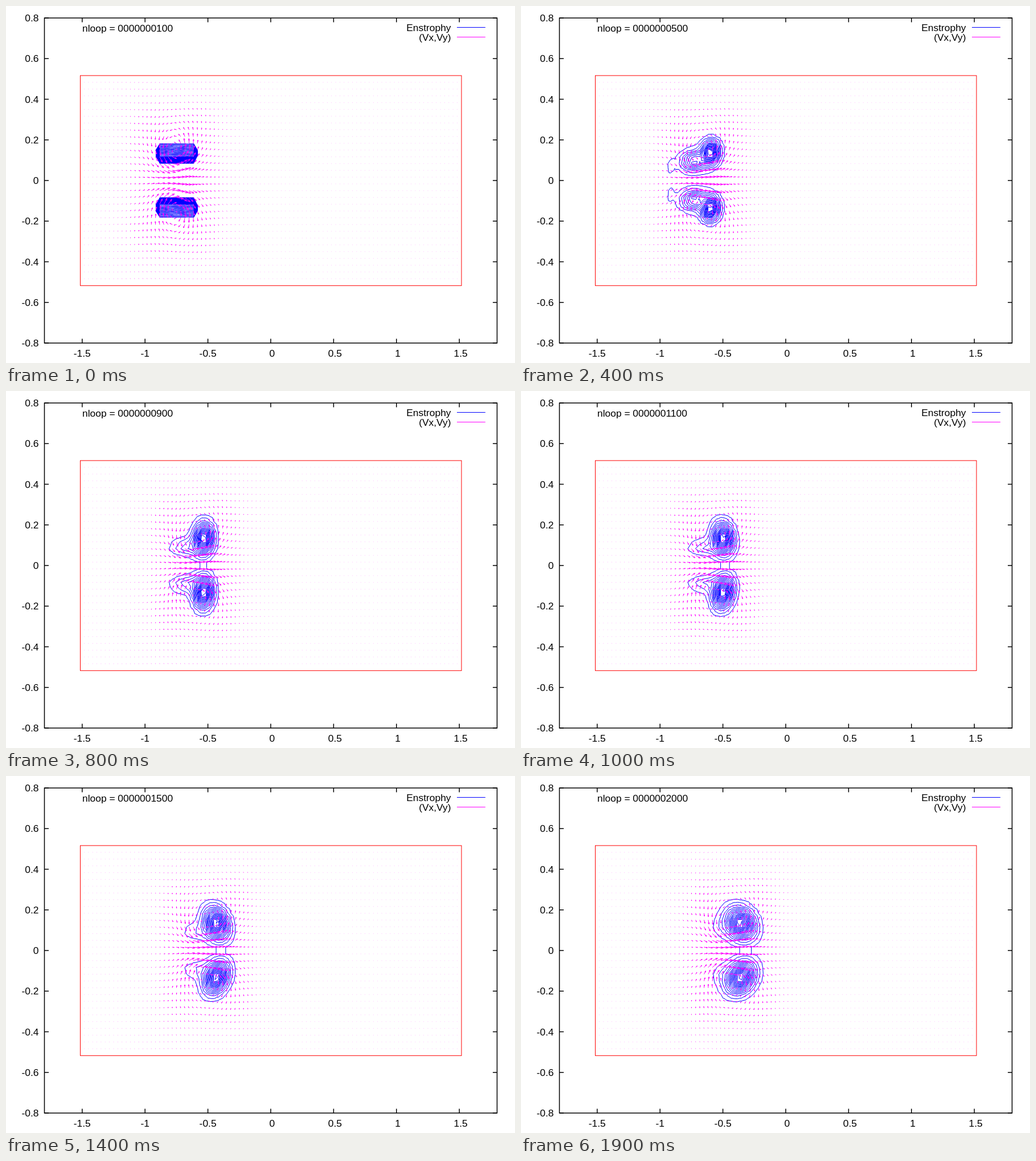
An HTML page with a canvas that plays this animation: 894 by 626 pixels, repeating every 2000 ms.

```html
<!DOCTYPE html>
<html lang="en">
<head>
<meta charset="utf-8">
<title>Vortex pair</title>
<style>
html, body { margin: 0; width: 100%; height: 100%; overflow: hidden; background: #fff; }
canvas { display: block; width: 894px; height: 626px; }
</style>
</head>
<body>
<canvas id="stage" width="894" height="626"></canvas>
<script>
const ctx = document.getElementById('stage').getContext('2d');
const BLUE = '#0000ff', PINK = '#ff00ff';
const OX = 465, OY = 306, SX = 220.8, SY = 356.25;
const STEP_MS = 100, STEPS = 20;
const COLS = 90, ROWS = 30, CELL = 1 / 30;
const LEVEL = 0.05, LEVELS = 19;

const px = x => OX + x * SX;
const py = y => OY - y * SY;
const mix = (a, b, t) => a + (b - a) * t;
const nodeX = c => (c - COLS / 2 + 0.5) * CELL;
const nodeY = r => (r - ROWS / 2 + 0.5) * CELL;

// Upper vortex as two blobs, each: cx, cy, sx, sy, tilt in degrees, strength
const KEYS = [
  { step: 0, body: [300, 256, 19, 11, 0, 1], tail: [292, 262, 17, 10, 0, 0.8] },
  { step: 4, body: [333, 257, 12, 15.5, 0, 1], tail: [303, 272, 19, 14, 0, 0.5] },
  { step: 8, body: [347, 259, 13, 21, 0, 1], tail: [317, 273, 25, 13, 0, 0.2] },
  { step: 12, body: [363, 259, 14.5, 22, -18, 1], tail: [328, 275, 29, 12, 0, 0.12] },
  { step: 19, body: [386, 259, 18, 23, -35, 1], tail: [350, 265, 20, 20, 0, 0.06] }
];

function poseAt(step) {
  let i = 0;
  while (i < KEYS.length - 2 && step >= KEYS[i + 1].step) i++;
  const a = KEYS[i], b = KEYS[i + 1];
  const t = (step - a.step) / (b.step - a.step);
  const between = part => a[part].map((v, j) => mix(v, b[part][j], t));
  const wisp = 0.12 * Math.max(0, 1 - Math.abs(step - 4) / 3);
  return { body: between('body'), tail: between('tail'), wisp: [263, 282, 6, 9, 0, wisp] };
}

function blob([cx, cy, sx, sy, tilt, strength], x, y) {
  const a = tilt * Math.PI / 180, dx = x - cx, dy = y - cy;
  const along = (dx * Math.cos(a) + dy * Math.sin(a)) / sx;
  const across = (dy * Math.cos(a) - dx * Math.sin(a)) / sy;
  return strength * Math.exp(-Math.pow(Math.hypot(along, across), 1.6));
}

function line(points, color, width = 1) {
  ctx.beginPath();
  points.forEach(([x, y]) => ctx.lineTo(x, y));
  ctx.strokeStyle = color;
  ctx.lineWidth = width;
  ctx.stroke();
}

// Adds the level lines of one triangle; corners are x, y, value
function cutTriangle(corners) {
  for (let k = 1; k <= LEVELS; k++) {
    const level = k * LEVEL, hits = [];
    corners.forEach((a, i) => {
      const b = corners[(i + 1) % 3];
      if ((a[2] < level) === (b[2] < level)) return;
      const t = (level - a[2]) / (b[2] - a[2]);
      hits.push([mix(a[0], b[0], t), mix(a[1], b[1], t)]);
    });
    if (hits.length === 2) {
      ctx.moveTo(...hits[0]);
      ctx.lineTo(...hits[1]);
    }
  }
}

function drawContours(pose) {
  const node = (c, r) => {
    const x = px(nodeX(c)), y = py(nodeY(r)), upper = py(Math.abs(nodeY(r)));
    const q = Object.values(pose).reduce((sum, b) => sum + blob(b, x, upper), 0);
    return [x, y, q];
  };
  const grid = Array.from({ length: COLS }, (_, c) =>
    Array.from({ length: ROWS }, (_, r) => node(c, r)));
  ctx.beginPath();
  for (let c = 0; c < COLS - 1; c++) {
    for (let r = 0; r < ROWS - 1; r++) {
      const a = grid[c][r], b = grid[c + 1][r + 1];
      cutTriangle([a, grid[c + 1][r], b]);
      cutTriangle([a, grid[c][r + 1], b]);
    }
  }
  ctx.strokeStyle = BLUE;
  ctx.lineWidth = 1;
  ctx.stroke();
}

// First state: flat plateau with streaks inside a steep rim
function drawPatch() {
  let seed = 7;
  const rnd = () => (seed = seed * 16807 % 2147483647) / 2147483647;
  ctx.fillStyle = BLUE;
  ctx.beginPath();
  for (const [x, y] of [[270, 241], [330, 241], [337, 253], [337, 262], [330, 276.5],
    [270, 276.5], [263, 264], [263, 252]]) ctx.lineTo(x, y);
  ctx.fill();
  ctx.fillStyle = '#5858ff';
  ctx.fillRect(270, 241.5, 59.5, 22.5);
  for (let i = 0; i < 90; i++) {
    const x = 270 + rnd() * 50, y = 242 + rnd() * 21;
    const end = Math.min(329, x + 4 + rnd() * 10);
    line([[x, y], [(x + end) / 2, y + rnd() * 2 - 1], [end, y + rnd() - 0.5]],
      i % 3 ? '#2020ff' : '#a4a4ff', 0.7);
  }
}

function drawPatches() {
  drawPatch();
  ctx.save();
  ctx.translate(0, 2 * OY);
  ctx.scale(1, -1);
  drawPatch();
  ctx.restore();
}

// Counter-rotating vortices strung from tail to body, fading away from the pair
function velocityField({ body, tail }) {
  const whirls = [], count = 5;
  for (let i = 0; i < count; i++) {
    const t = i / (count - 1);
    const x = (mix(tail[0] - 8, body[0] + 8, t) - OX) / SX;
    const y = (OY - mix(tail[1], body[1], t)) / SY;
    whirls.push([x, y, 1], [x, -y, -1]);
  }
  const midX = ((tail[0] + body[0]) / 2 - OX) / SX;
  const raw = (x, y) => {
    let u = 0, v = 0;
    for (const [wx, wy, spin] of whirls) {
      const dx = x - wx, dy = y - wy, f = spin / (dx * dx + dy * dy + 0.004);
      u -= f * dy;
      v += f * dx;
    }
    const fade = Math.exp(-((x - midX) ** 2 + y * y) / 0.3);
    return [u * fade, v * fade];
  };
  const scale = 0.066 / raw(midX, CELL / 2)[0];
  return (x, y) => raw(x, y).map(c => c * scale);
}

function drawArrows(pose) {
  const field = velocityField(pose);
  ctx.fillStyle = 'rgba(255,0,255,0.3)';
  ctx.strokeStyle = PINK;
  ctx.lineWidth = 1;
  ctx.beginPath();
  for (let r = 0; r < ROWS; r++) {
    for (let c = 0; c < COLS; c++) {
      const [u, v] = field(nodeX(c), nodeY(r));
      const ax = px(nodeX(c)), ay = py(nodeY(r));
      const dx = u * SX, dy = -v * SY;
      const len = Math.hypot(dx, dy), dir = Math.atan2(dy, dx);
      const bx = ax + dx, by = ay + dy;
      ctx.fillRect(ax - 0.4, ay - 0.5, 0.8, 1);
      ctx.moveTo(ax, ay);
      ctx.lineTo(bx, by);
      if (len < 1.5) continue;
      const head = Math.min(5, len * 0.4);
      for (const turn of [-0.36, 0.36]) {
        ctx.moveTo(bx, by);
        ctx.lineTo(bx - head * Math.cos(dir + turn), by - head * Math.sin(dir + turn));
      }
    }
  }
  ctx.stroke();
}

function label(text, x, y, align) {
  ctx.textAlign = align;
  ctx.fillText(text, x, y);
}

function drawAxes(step) {
  const L = 67.5, R = 862.5, T = 21, B = 591, tick = 7.5;
  ctx.font = '17.4px "Liberation Sans", Arial, sans-serif';
  ctx.fillStyle = '#000';
  ctx.strokeStyle = '#000';
  ctx.lineWidth = 1.5;
  ctx.strokeRect(L, T, R - L, B - T);
  for (let i = -3; i <= 3; i++) {
    const x = px(i / 2);
    line([[x, B], [x, B - tick]], '#000', 1.5);
    line([[x, T], [x, T + tick]], '#000', 1.5);
    label(String(i / 2), x + (i < 0 ? 0 : 2.4), 614.5, 'center');
  }
  for (let i = -4; i <= 4; i++) {
    const y = py(i / 5);
    line([[L, y], [L + tick, y]], '#000', 1.5);
    line([[R, y], [R - tick, y]], '#000', 1.5);
    label(String(i / 5), 57.5, y + 6, 'right');
  }
  label('nloop = ' + String((step + 1) * 100).padStart(10, '0'), 134, 45, 'left');
  label('Enstrophy', 781.5, 43.5, 'right');
  label('(Vx,Vy)', 781.5, 61, 'right');
  line([[792, 37.5], [842, 37.5]], BLUE);
  line([[792, 54.5], [842, 54.5]], PINK);
  ctx.strokeStyle = '#ff0000';
  ctx.strokeRect(130.5, 122, 669.5, 368.3);
}

function draw(step) {
  const pose = poseAt(step);
  ctx.fillStyle = '#fff';
  ctx.fillRect(0, 0, 894, 626);
  if (step === 0) drawPatches();
  else drawContours(pose);
  drawArrows(pose);
  drawAxes(step);
}

let shown = -1;
const start = performance.now();
function tick() {
  const step = Math.floor(Math.max(0, performance.now() - start) / STEP_MS) % STEPS;
  if (step !== shown) draw(shown = step);
  requestAnimationFrame(tick);
}
tick();
</script>
</body>
</html>
```
